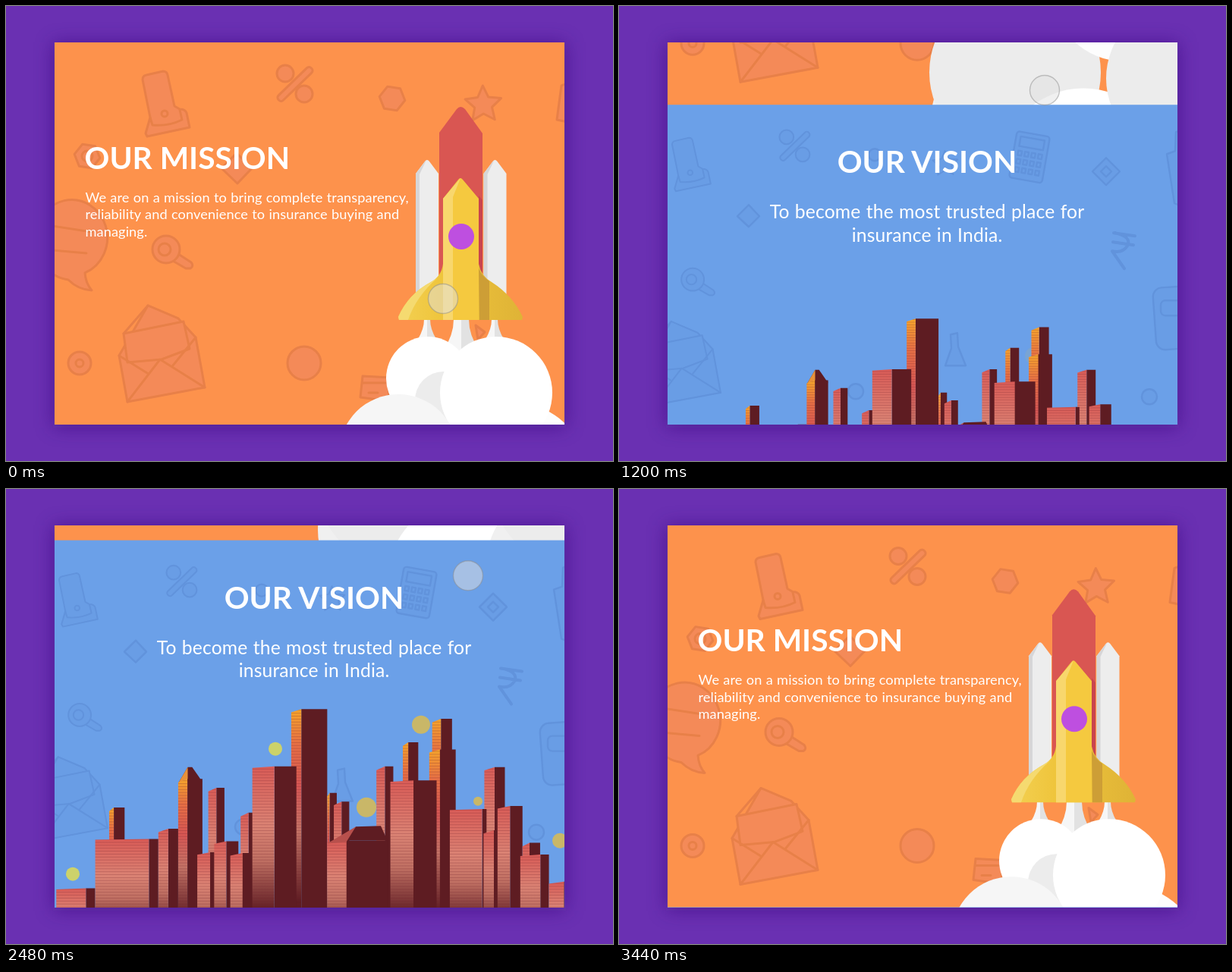
Animation, 800 px wide and 600 px high, one loop 3.48 s. Source, as an HTML page:

```html
<!DOCTYPE html>
<html lang="en">
<head>
<meta charset="utf-8">
<title>Mission and vision</title>
<style>
html, body { margin: 0; width: 100%; height: 100%; overflow: hidden; background: #6a30b2; }
svg { display: block; width: 800px; height: 600px; }
text { font-family: Lato, Inter, sans-serif; fill: #fff; }
.title { font-size: 40.7px; font-weight: 700; }
.body { font-size: 18.2px; letter-spacing: .1px; word-spacing: .5px; }
.lead { font-size: 24.7px; letter-spacing: .15px; word-spacing: .8px; }
.mid { text-anchor: middle; }
.warm { fill: #f48a58; stroke: #e88048; stroke-width: 3; stroke-linejoin: round; stroke-linecap: round; }
.cool { fill: #699de5; stroke: #6193dc; stroke-width: 2.4; stroke-linejoin: round; stroke-linecap: round; }
.line { fill: none; }
</style>
</head>
<body>
<svg viewBox="0 0 800 600">
  <defs>
    <clipPath id="card"><rect x="64" y="48" width="672" height="504"/></clipPath>
    <filter id="blur" x="-10%" y="-10%" width="120%" height="120%"><feGaussianBlur stdDeviation="12"/></filter>
    <linearGradient id="wall" x2="0" y2="1">
      <stop offset="0" stop-color="#d95c57"/><stop offset=".3" stop-color="#db8374"/>
      <stop offset=".48" stop-color="#c07063"/><stop offset=".74" stop-color="#5e1c22"/>
    </linearGradient>
    <linearGradient id="glow" x2="0" y2="1">
      <stop offset="0" stop-color="#f6a52c"/><stop offset=".14" stop-color="#e66f45"/>
      <stop offset=".3" stop-color="#d65653"/><stop offset=".48" stop-color="#c47366"/>
      <stop offset=".76" stop-color="#5e1c22"/>
    </linearGradient>
    <linearGradient id="wing">
      <stop offset="0" stop-color="#f3d052"/><stop offset=".35" stop-color="#efc53c"/><stop offset="1" stop-color="#dfb336"/>
    </linearGradient>
    <pattern id="rows" width="4" height="4" patternUnits="userSpaceOnUse"><rect width="4" height="1" fill="#6a1c26" opacity=".25"/></pattern>

    <g id="phone">
      <path d="M180 97Q180 92 185 91L207 86Q212 86 213 91L222 132L229 136Q236 136 238 141L242 160L186 172L184 168L190 147Z"/>
      <path class="line" d="M190 147L193 157Q214 159 232 150L229 137"/>
      <circle cx="209" cy="142" r="4"/>
    </g>
    <g id="percent">
      <rect x="-30" y="-4.5" width="60" height="9" rx="4" transform="translate(381 103) rotate(-44)"/>
      <circle cx="368" cy="89" r="11"/><circle cx="393" cy="116" r="11"/>
    </g>
    <g id="lens">
      <path d="M224 325L244 338Q248 343 243 346L237 346L218 335Z"/>
      <circle cx="211" cy="321" r="18"/><circle cx="209" cy="321" r="8"/>
    </g>
    <g id="mail">
      <path d="M149 461L187 395L227 412L250 437L262 503L160 522Z"/>
      <path d="M155 432L234 416L242 452L205 466L160 470Z"/>
      <path class="line" d="M149 461L186 484M250 437L220 474M160 522L203 466L262 503M155 432L187 395"/>
    </g>
    <path id="star"/>
    <path id="hex"/>
    <g id="booster">
      <path d="M540 221L552 205Q555 201 558 205L570 221V390H540Z" fill="#ededed"/>
      <path d="M540 221L554 203L545 222V390H540Z" fill="#d6d6d8"/>
    </g>
  </defs>

  <rect width="800" height="600" fill="#6a30b2"/>
  <rect x="62" y="48" width="676" height="508" fill="#35107a" opacity=".55" filter="url(#blur)"/>

  <g clip-path="url(#card)">
    <g id="mission">
      <rect x="64" y="48" width="672" height="505" fill="#fd924c"/>
      <g class="warm">
        <use href="#phone"/><use href="#percent"/><use href="#star" x="629" y="130"/>
        <use href="#hex" x="509" y="122"/>
        <use href="#hex" x="107" y="198"/><circle cx="107" cy="198" r="7"/>
        <path d="M304 194L324 214L305 234L284 214Z"/>
        <path d="M740 102L732 105L726 150L740 153Z"/>
        <path d="M40 312A47 50 0 1 1 104 352Q105 366 113 375Q95 374 82 361A48 50 0 0 1 40 312Z"/>
        <path class="line" d="M60 290L113 298M60 322L106 326"/>
        <use href="#lens"/><use href="#mail"/>
        <circle cx="97" cy="471" r="15"/><circle cx="97" cy="471" r="5"/>
        <circle cx="393" cy="471" r="22"/>
        <path d="M470 488L506 490L504 521L467 516Z"/><path class="line" d="M470 497H500M478 510H490"/>
        <path d="M619 421L631 430L622 440Z"/>
      </g>
      <text class="title" x="103.5" y="215">OUR MISSION</text>
      <text class="body" x="104.5" y="259">We are on a mission to bring complete transparency,</text>
      <text class="body" x="104.5" y="281.5">reliability and convenience to insurance buying and</text>
      <text class="body" x="104.5" y="304">managing.</text>
    </g>

    <g id="rocket">
      <path d="M571 167L594 136Q599 130 605 136L628 168V370H571Z" fill="#d95652"/>
      <path d="M623 250L628 256V370H622Z" fill="#c9444e"/>
      <use href="#booster"/><use href="#booster" x="89.5"/>
      <g id="jets"></g>
      <path d="M576 340Q574 356 560 364Q530 380 517 410L518 414H680L681 410Q668 382 640 364Q626 356 623 340Z" fill="url(#wing)"/>
      <path d="M517 410Q530 380 560 364L568 359Q540 384 530 414H518Z" fill="#f5da70"/>
      <path d="M576 254L596 229Q599 225 602 229L623 254V414H576Z" fill="#f5c93f"/>
      <path d="M576 254L599 227L589 252V414H576Z" fill="#f8d76d"/>
      <path d="M623 346Q627 356 637 363V414H624Z" fill="#cd9e36"/>
      <circle cx="600" cy="304" r="17" fill="#be4fe0"/>
      <g id="clouds"></g>
    </g>

    <g id="vision">
      <rect x="64" y="0" width="672" height="520" fill="#6ba0e8"/>
      <g class="cool">
        <use href="#phone" transform="translate(-77.6 -27) scale(.82)"/>
        <use href="#percent" transform="translate(-92 -33) scale(.85)"/>
        <circle cx="337" cy="66" r="8"/>
        <use href="#star" transform="translate(430 78) scale(.7)"/>
        <g transform="translate(541 69) rotate(10)">
          <rect x="-22" y="-31" width="44" height="62" rx="4"/>
          <rect x="-16" y="-25" width="32" height="13"/>
          <g id="keys"></g>
        </g>
        <path d="M642 70L660 88L642 106L624 88Z"/><path d="M642 81L649 88L642 95L635 88Z"/>
        <path d="M740 34L734 36L733 61L722 65L732 130L740 133Z"/>
        <path d="M171 132L185 147L171 161L156 147Z"/>
        <path class="line" stroke-width="4" d="M652 169L680 173M651 181L678 185M654 169Q676 174 670 186Q664 196 650 193L666 216"/>
        <use href="#lens" transform="translate(-78 -36) scale(.83)"/>
        <use href="#mail" transform="translate(-94 -58) scale(.87)"/>
        <rect x="703" y="242" width="60" height="82" rx="12" transform="rotate(-4 703 242)"/>
        <rect x="714" y="258" width="40" height="20" rx="6"/>
        <path d="M437 303L446 301L447 319L457 344H430L438 321Z"/>
        <circle cx="699" cy="385" r="10"/><circle cx="312" cy="378" r="10"/>
      </g>
      <text class="title mid" x="406" y="90">OUR VISION</text>
      <text class="lead mid" x="406" y="150">To become the most trusted place for</text>
      <text class="lead mid" x="406" y="180.5">insurance in India.</text>
    </g>
    <g id="badges"></g>
    <g id="city"></g>
    <circle id="touch" r="19.5" fill="#e2e2e2" fill-opacity=".5" stroke="#8e8e8e" stroke-opacity=".5" stroke-width="1.4"/>
  </g>
</svg>
<script>
const LOOP = 3480, PAGE = 502.6;
const $ = id => document.getElementById(id);
const disc = (x, y, r, fill) => `<circle cx="${x}" cy="${y}" r="${r}" fill="${fill}"/>`;
const poly = (pts, fill) => `<polygon points="${pts}" fill="${fill}"/>`;
const range = n => [...Array(n).keys()];

// closed outline with n corners, radius cycling through radii
const ring = (n, radii, turn) => 'M' + range(n).map(i => {
  const a = turn + i * 2 * Math.PI / n, r = radii[i % radii.length];
  return `${r * Math.cos(a)} ${r * Math.sin(a)}`;
}).join('L') + 'Z';
$('star').setAttribute('d', ring(10, [25, 12], -1.6));
$('hex').setAttribute('d', ring(6, [17], .15));
$('keys').innerHTML = range(12).map(i =>
  `<rect x="${-16 + i % 4 * 9}" y="${-6 + Math.floor(i / 4) * 11}" width="5" height="6"/>`).join('');

const puff = (fill, ...p) => disc(...p, fill);
const WHITE = '#fff', PALE = '#f6f6f6', GREY = '#ececec';
$('clouds').innerHTML =
  puff('#f0f0f0', 511, 800, 100) + puff(GREY, 522, 737, 113) + puff(WHITE, 612, 868, 110) +
  puff('#f0f0f0', 742, 850, 110) + puff(WHITE, 556, 491, 55) + puff(GREY, 577, 520, 38) +
  puff(PALE, 517, 590, 78) + puff('#fdfdfd', 668, 623, 100) + puff(GREY, 742, 745, 100) +
  puff(WHITE, 646, 510, 74);

function jet(x, neck, mouth, h) {
  const side = (d, fill) => `<path d="M${x} 413H${x + d * neck}Q${x + d * neck} ${413 + h / 2} ${x + d * mouth} ${413 + h}H${x}Z" fill="${fill}"/>`;
  return side(-1, '#f6f6f6') + side(1, '#e2e2e2');
}
$('jets').innerHTML = jet(555, 4, 12, 26) + jet(600, 10, 24, 42) + jet(644, 4, 12, 26);

const LEMON = '#e4df4c', GOLD = '#e0bd4a';
$('badges').innerHTML =
  disc(88, 464, 9, LEMON) + disc(355, 299, 9, LEMON) + disc(547, 267, 12, GOLD) +
  disc(475, 376, 13, GOLD) + disc(622, 368, 6, GOLD) + disc(730, 420, 10, GOLD);

// tower: left, width, top, lit share; tall towers with a narrow lit side catch the sun
const DARK = '#5e1c22', BASE = 600;
function tower([left, width, top, share = .5]) {
  const lit = width * share, corner = left + lit, slant = Math.min(5, 60 / lit);
  const face = `${left},${top + slant} ${corner},${top} ${corner},${BASE} ${left},${BASE}`;
  return poly(`${corner},${top} ${left + width},${top} ${left + width},${BASE} ${corner},${BASE}`, DARK) +
    poly(face, `url(#${share < .45 && top < 390 ? 'glow' : 'wall'})`) + poly(face, 'url(#rows)');
}
const row = (...list) => list.map(tower).join('');
$('city').innerHTML =
  poly('221,356 234,334 240,334 254,354', DARK) + poly('221,356 234,334 234,356', '#e8913a') +
  row([127, 21, 389, .3], [55, 53, 499, .76], [262, 22, 362], [306, 18, 396, .6],
    [108, 86, 432, .85], [194, 27, 418], [221, 33, 350, .38], [247, 25, 450, .7], [270, 33, 435], [292, 33, 451],
    [375, 49, 255, .28], [322, 60, 333], [424, 13, 369, .25], [433, 21, 381],
    [491, 23, 333], [527, 21, 300, .35], [567, 27, 268, .44], [563, 36, 310, .4], [510, 63, 352],
    [424, 82, 434, .32]) +
  poly('446,434 463,415 497,414 506,434', DARK) + poly('424,438 463,415 450,436', '#b8504c') +
  row([638, 28, 334], [591, 50, 391, .88], [637, 20, 420, .7], [656, 34, 387], [690, 24, 437, .4],
    [687, 39, 453, .7], [726, 34, 490, .6]);

// page travel: a slow drag released with a throw, then a quick flick back
const drag = t => 1 - Math.exp(-Math.exp((t - 1056) / 238));
const flick = t => 1 / (1 + Math.exp((2783 - t) / 96));
const BACK = 2280;
const from = (curve, t, t0) => t < t0 ? 0 : (curve(t) - curve(t0)) / (1 - curve(t0));
const scroll = t => PAGE * (from(drag, t, 0) - from(flick, t, BACK));

const unit = v => Math.max(0, Math.min(1, v));
const smooth = v => { const u = unit(v); return u * u * (3 - 2 * u); };

// the finger sticks to the page, drifts up while resting, then pulls down
function finger(t, s) {
  const drift = smooth((t - 1200) / 1200);
  return [
    576 - 15 * unit(t / 920) ** 2 + 48 * drift,
    t < BACK ? 386 - Math.min(1.03 * s, 275) - 15 * drift : 96 + Math.min(PAGE - s, 303)
  ];
}

const place = (id, v) => $(id).setAttribute('transform', v);
const fade = (id, v) => $(id).setAttribute('opacity', v);
function draw(t) {
  const s = scroll(t), away = (PAGE - s) / 18.5, k = Math.max(.4, 1 - .033 * away);
  place('mission', `translate(0 ${-s})`);
  place('rocket', `translate(0 ${-1.54 * s})`);
  place('vision', `translate(0 ${552 - s})`);
  place('city', `translate(${404 * (1 - k)} ${44.4 * away}) scale(${k})`);
  place('badges', `translate(0 ${44.5 * away})`);
  place('touch', `translate(${finger(t, s)})`);
  fade('badges', unit(1 - .2 * away));
  fade('touch', 1 - smooth((t - 3000) / 200));
}
const start = performance.now();
function tick() {
  draw((performance.now() - start) % LOOP);
  requestAnimationFrame(tick);
}
tick();
</script>
</body>
</html>
```
